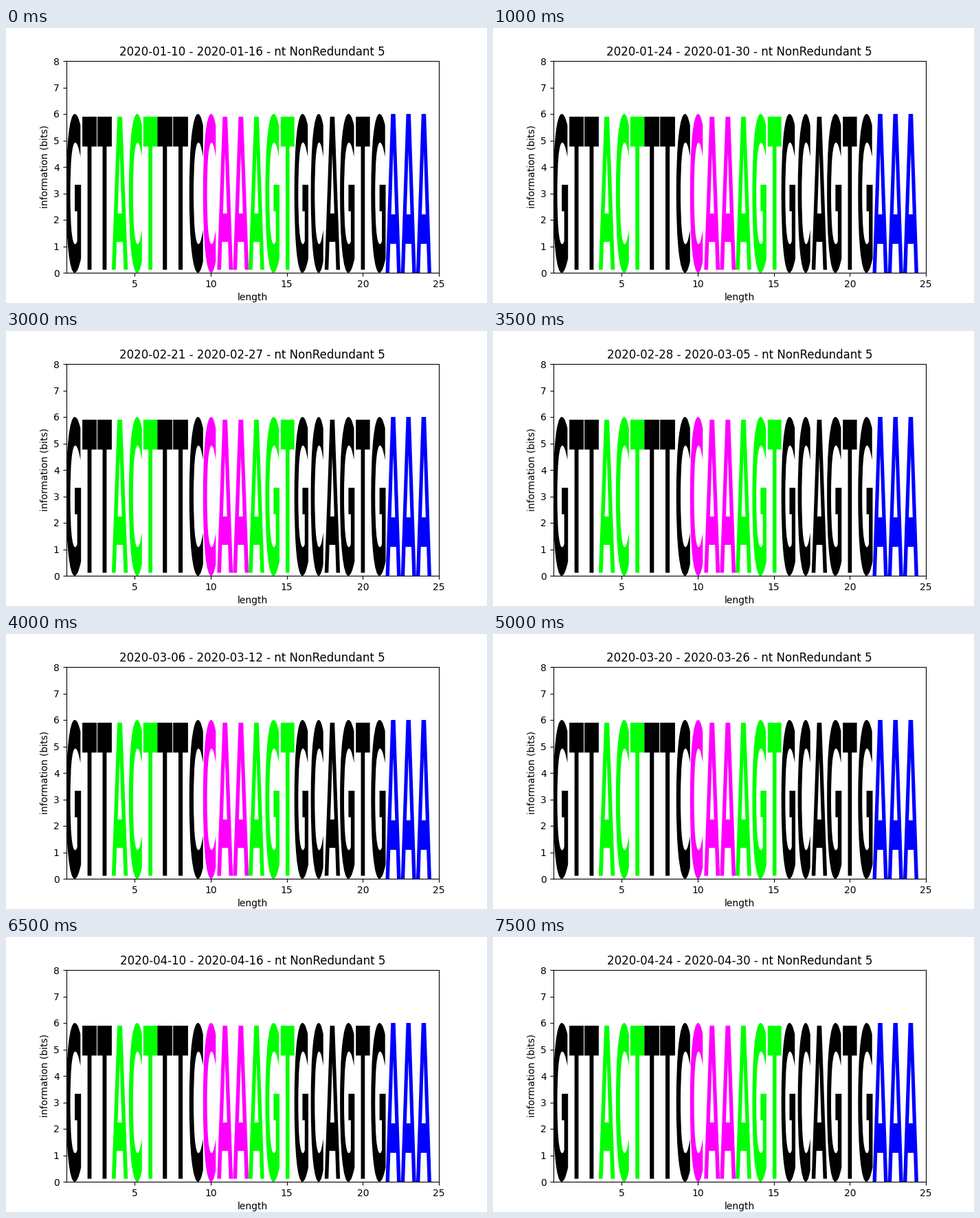
Recreate the animation shown at these times as a matplotlib script. Size 700 by 400 pixels, loop 8 s.

```python
import matplotlib.pyplot as plt
import numpy as np
from matplotlib.animation import FuncAnimation
from matplotlib.patches import PathPatch
from matplotlib.textpath import TextPath
from matplotlib.transforms import Affine2D

plt.rcParams["font.family"] = "DejaVu Sans"

WEEKS = 16
START = np.datetime64("2020-01-10")
BOLD = {"family": "DejaVu Sans", "weight": "bold"}
HEIGHT = 6
CODONS = [
    ("GTT", "black"), ("ACT", "lime"), ("TTC", "black"), ("CAA", "magenta"),
    ("AGT", "lime"), ("GCA", "black"), ("GTG", "black"), ("AAA", "blue"),
]

fig, ax = plt.subplots(figsize=(7, 4), dpi=100)
fig.subplots_adjust(left=0.125, right=0.9, bottom=0.11, top=0.88)


def add_codon(word, color, x, width, height):
    """Stretch a word so that its outline fills the given box."""
    path = TextPath((0, 0), word, size=100, prop=BOLD)
    box = path.get_extents()
    fit = (Affine2D().translate(-box.x0, -box.y0)
           .scale(width / box.width, height / box.height)
           .translate(x, 0))
    ax.add_patch(PathPatch(fit.transform_path(path), fc=color, lw=0))


for i, (word, color) in enumerate(CODONS):
    add_codon(word, color, 0.5 + 3 * i, 3, HEIGHT)

ax.set(xlim=(0.5, 25), ylim=(0, 8), xlabel="length", ylabel="information (bits)",
       xticks=range(5, 26, 5), yticks=range(9))
title = ax.set_title("")


def update(week):
    first = START + 7 * week
    title.set_text(f"{first} - {first + 6} - nt NonRedundant 5")
    return [title]


anim = FuncAnimation(fig, update, frames=WEEKS, interval=500,
                     repeat=True, repeat_delay=0)
plt.show()
```
